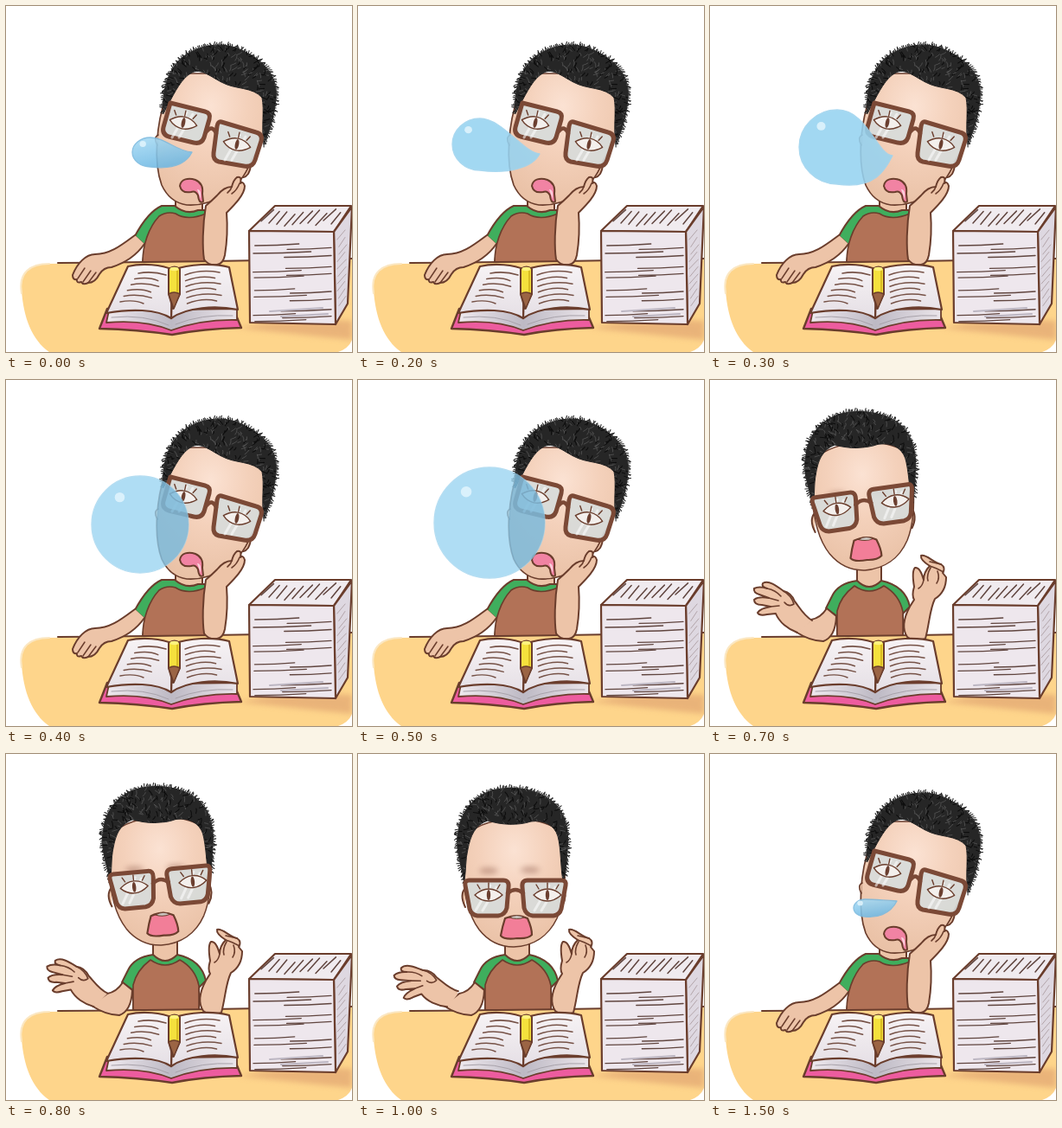
An HTML page that plays this animation: 400 by 400 pixels, repeating every 1600 ms.

```html
<!DOCTYPE html>
<html lang="en">
<head>
<meta charset="utf-8">
<title>Asleep at the desk</title>
<style>
html, body { margin: 0; width: 100%; height: 100%; overflow: hidden; background: #fff; }
svg { display: block; width: 100vw; height: 100vh; }
</style>
</head>
<body>
<svg id="stage" viewBox="0 0 400 400" fill="none" stroke-linecap="round" stroke-linejoin="round">
  <defs>
    <radialGradient id="brow" cx=".5" cy=".25" r=".75">
      <stop offset="0" stop-color="#fbe2d3"/><stop offset=".45" stop-color="#f4d1bb"/><stop offset="1" stop-color="#eac2a7"/>
    </radialGradient>
    <linearGradient id="page" x2="0" y2="1">
      <stop offset="0" stop-color="#f7f3f5"/><stop offset="1" stop-color="#e5dfe5"/>
    </linearGradient>
    <linearGradient id="edge">
      <stop offset="0" stop-color="#efe9ee"/><stop offset=".5" stop-color="#bdb9c4"/><stop offset="1" stop-color="#ebe5ea"/>
    </linearGradient>
    <linearGradient id="water" x2=".4" y2="1">
      <stop offset="0" stop-color="#a9dcf5"/><stop offset="1" stop-color="#6fb9e4"/>
    </linearGradient>
    <filter id="soft" x="-50%" y="-50%" width="200%" height="200%"><feGaussianBlur stdDeviation="3"/></filter>
    <clipPath id="cheek"><path id="cheekShape"/></clipPath>
  </defs>
  <g id="bodies"></g>
  <g id="desk"></g>
  <g id="people"></g>
  <g id="props"></g>
  <g id="bubble"></g>
  <g id="rays"></g>
</svg>
<script>
(() => {
const LINE = '#6a3d2c', FRAME = '#7b4936', SKIN = '#edc4a8', GREEN = '#3fae5d', SHIRT = '#b27257';
const $ = id => document.getElementById(id);
const path = (d, fill = 'none', stroke = LINE, w = 2, more = '') =>
  `<path d="${d}" fill="${fill}" stroke="${stroke}" stroke-width="${w}" ${more}/>`;
const oval = (x, y, rx, ry, fill, more = '') =>
  `<ellipse cx="${x}" cy="${y}" rx="${rx}" ry="${ry}" fill="${fill}" ${more}/>`;
const group = (id, inner) => `<g id="${id}">${inner}</g>`;
const mix = (a, b, k) => a + (b - a) * k;

let seed = 7;
const rnd = () => (seed = seed * 16807 % 2147483647) / 2147483647;

// Dark mass with short strands inside and tufts along the outer arc
function hair(id, outer, inner, cx, cy) {
  const arc = document.createElementNS('http://www.w3.org/2000/svg', 'path');
  arc.setAttribute('d', outer);
  const len = arc.getTotalLength();
  let tufts = '', strands = '', dark = '';
  for (let s = 0; s < len; s += 2) {
    const p = arc.getPointAtLength(s), a = Math.atan2(p.y - cy, p.x - cx) + (rnd() - .5) * 1.6;
    const r = 1.5 + rnd() * 3;
    tufts += `M${p.x},${p.y}l${Math.cos(a) * r},${Math.sin(a) * r}`;
  }
  for (let i = 0; i < 620; i++) {
    const x = cx + (rnd() - .5) * 140, y = cy + (rnd() - .5) * 126;
    const a = Math.atan2(y - cy - 30, x - cx) + (rnd() - .5) * 2, r = 3 + rnd() * 4;
    const dx = Math.cos(a) * r, dy = Math.sin(a) * r;
    const d = `M${x},${y}q${dx * .6 + 1},${dy * .6} ${dx},${dy}`;
    if (i % 2) strands += d; else dark += d;
  }
  const d = outer + inner;
  return `<clipPath id="${id}"><path d="${d}"/></clipPath>` +
    path(d, '#262626', '#262626', 1) + path(tufts, 'none', '#262626', 1.1) +
    `<g clip-path="url(#${id})">${path(strands, 'none', '#5d5d5d', .7)}${path(dark, 'none', '#0d0d0d', 1.1)}</g>`;
}

const eye = (x, y, turn) => `<g transform="translate(${x} ${y}) rotate(${turn})">` +
  path('M-16,0Q-8,-7 0,-7Q9,-7 16,0Q8,7 0,7Q-9,7 -16,0Z', '#f3efec', LINE, 1.4) +
  oval(0, 0, 2.2, 6, '#6b3f30') +
  path('M-10,-7L-13,-12M0,-8V-14M10,-7L13,-12', 'none', LINE, 1.4) + '</g>';

const lens = d => path(d, 'rgba(215,220,219,.9)', FRAME, 5);
const glare = (x, y) => path(`M${x},${y + 15}L${x + 17},${y - 14}M${x + 8},${y + 15}L${x + 24},${y - 12}`,
  'none', 'rgba(255,255,255,.55)', 3);

// Desk
$('desk').innerHTML =
  path('M46,298C26,299 17,309 18,328C20,360 30,386 50,400H384Q396,396 400,386V293C290,294 160,297 46,298Z', '#fed58b', 'none') +
  path('M268,372Q330,360 400,364V386Q340,380 268,372Z', '#e3a873', 'none', 0, 'filter="url(#soft)" opacity=".75"') +
  path('M18,332C14,308 28,298 50,298', 'none', '#fbe7c2', 2) +
  path('M60,297Q220,296 400,292', 'none', LINE, 2);

// Book, pencil and paper stack
let ruled = '';
for (let i = 0; i < 6; i++) {
  const y = 309 + i * 6.6, x = 153 - i * 4.2;
  ruled += `M${x},${y}q16,-3 ${i % 2 ? 27 : 32},2`;
  ruled += `M${207 + i * .5},${y + 2}q18,-7 ${i % 2 ? 34 : 40},-3`;
}
const book =
  path('M117,350L108,373Q152,374 192,380Q228,373 272,372L262,348Z', '#ed5c9f', LINE, 2.4) +
  path('M119,352L116,366Q160,362 191,375Q226,362 267,363L267,350Z', 'url(#edge)', LINE, 1.8) +
  path('M141,301C158,297 180,299 193,305L191,361C174,350 144,350 116,355Z', 'url(#page)', LINE, 2.2) +
  path('M193,305C212,298 240,297 258,302L268,351C242,346 209,348 191,361Z', 'url(#page)', LINE, 2.2) +
  path(ruled, 'none', '#765247', 1.5) +
  path('M122,360Q160,356 188,369M196,368Q226,356 262,358', 'none', '#a8a2aa', 1);
const pencil =
  path('M188,304V333L193,350L201,333V304Q195,299 188,304Z', '#f5e13d', LINE, 2) +
  path('M188,333Q194,329 201,333L194,350Z', '#9b6444', LINE, 1.5) +
  path('M198,306V330', 'none', '#d8bb22', 2) + oval(194.5, 304, 5, 2.2, '#fff27e');

let frontLines = '', topLines = '', sideLines = '';
for (let b = 0; b < 4; b++) {
  for (let i = 0; i < 4; i++) {
    const y = 276 + b * 25 + i * 4 + rnd() * 2, right = (b + i) % 2;
    const x = right ? 312 + rnd() * 18 : 285 + rnd() * 3, end = right ? 376 : 330 + rnd() * 30;
    frontLines += `M${x},${y + 1}Q${(x + end) / 2},${y + 1} ${end},${y - 1}`;
  }
}
for (let i = 0; i < 10; i++) {
  const x = 295 + i * 9, dy = rnd() * 10;
  topLines += `M${x},${256 - dy}l${10 + rnd() * 5},-${13 + rnd() * 2}`;
  sideLines += `M${382 + rnd() * 3},${270 + i * 8.5}l${7 + rnd() * 4},-11`;
}
const papers =
  path('M281,260L311,231L399,231L379,261Z', '#f0ebef', LINE, 2.2) +
  path('M379,261L400,232L395,344L381,368Z', '#ded8e1', LINE, 2.2) +
  path('M281,260L379,261L381,368L282,366Z', '#eee7ed', LINE, 2.2) +
  path(frontLines, 'none', '#60453f', 1.4) + path(topLines, 'none', '#60453f', 1.5) +
  path(sideLines, 'none', '#b3a5aa', 1) +
  path('M305,353L366,349M318,359L372,356', 'none', '#bcb6c2', 2);
$('props').innerHTML = book + pencil + papers;

// Torsos sit behind the desk edge
$('bodies').innerHTML =
  group('napBody',
    path('M196,212V237Q211,244 227,236V218Z', SKIN) +
    path('M180,231Q164,238 149,266L161,277L158,296H232L231,236L222,236Q208,242 195,231Z', GREEN) +
    path('M158,296C158,276 165,256 177,243Q186,237 196,240Q210,249 231,240V296Z', SHIRT, LINE, 1.6)) +
  group('wokeBody',
    path('M170,208V239Q184,246 198,239V208Z', SKIN) +
    path('M170,232Q148,235 141,250L134,264L147,273V296H223V270L231,262Q226,238 198,232Q184,246 170,232Z', GREEN) +
    path('M147,296V267Q151,250 167,238Q184,250 201,238Q219,248 223,268V296Z', SHIRT, LINE, 1.6));

// Dozing pose
const napFace = 'M185,105C174,135 170,180 180,207C186,220 195,228 209,230C238,232 270,213 282,182L299,150V104L256,78H205Z';
$('cheekShape').setAttribute('d', napFace);
const napHead =
  path('M276,178Q287,180 280,194Q275,201 268,196', SKIN) +
  path(napFace, 'url(#brow)', LINE, 1.7) +
  path('M176,149Q170,152 175,161', SKIN, LINE, 1.6) +
  hair('napHair', 'M182,124C180,100 186,78 200,63C215,48 245,39 270,50C296,61 315,80 312,107C310,130 303,148 298,160',
    'C295,140 299,120 296,106C285,93 265,97 249,88C234,80 225,72 215,77C203,83 195,100 188,113Z', 248, 100) +
  lens('M190,112L230,122Q237,124 235,131L229,152Q226,160 217,158L188,151Q180,148 182,140Z') +
  lens('M249,134L289,146Q297,148 295,156L288,178Q285,187 275,185L246,180Q239,178 240,170L244,139Q245,133 249,134Z') +
  glare(192, 137) + glare(253, 163) + eye(205, 135, 12) + eye(267, 160, 12) +
  path('M232,145Q238,137 243,147', 'none', FRAME, 4.5) +
  path('M201,208C202,200 211,198 219,201C226,204 228,210 227,217L228,226Q223,229 222,219Q219,213 214,215Q203,217 201,208Z', '#f183a3', LINE, 2) +
  path('M221,212Q226,211 225,223', '#fbd3dd', 'none');
const napArms =
  path('M149,265C134,276 121,287 103,287C92,287 82,298 77,311Q77,317 82,316Q81,321 87,319Q89,323 95,320Q103,320 108,310Q113,302 122,302Q147,294 160,275', SKIN) +
  path('M83,315L91,303M89,319L98,306M95,320L104,308', 'none', LINE, 1.5) +
  path('M231,231C227,255 227,280 229,293Q235,301 244,299Q251,298 253,288Q257,264 255,239C264,230 276,218 276,208Q274,202 271,205Q273,196 267,198Q263,201 261,209Q252,209 244,219Q238,225 231,231Z', SKIN) +
  path('M270,205Q267,213 261,217M261,209Q260,213 256,216', 'none', LINE, 1.6);

// Startled pose
const wokeFace =
  path('M124,155Q117,163 124,177M236,152Q243,163 236,176', SKIN) +
  path('M122,130C122,165 128,187 140,203C151,217 165,223 180,223C202,222 220,211 230,190C237,174 240,150 239,125L231,88C210,70 150,70 128,92Z', 'url(#brow)', LINE, 1.5) +
  `<g filter="url(#soft)" opacity=".4">${oval(151, 135, 11, 4, '#8a5747')}${oval(199, 134, 11, 4, '#8a5747')}</g>` +
  hair('wokeHair', 'M123,146C118,125 112,105 116,90C119,65 136,46 160,41C185,36 215,43 229,59C242,73 244,95 242,110C241,125 240,138 237,147',
    'C234,130 235,110 231,95C227,82 215,76 200,78C185,83 165,82 150,77C135,82 130,95 127,110C124,122 125,135 123,146Z', 179, 98);
const rim = 'M-54,-20H-14Q-7,-20 -8,-12L-10,12Q-12,20 -20,21H-44Q-51,20 -53,13L-58,-14Q-59,-20 -54,-20Z';
const specs =
  lens(rim) + `<g transform="scale(-1 1)">${lens(rim)}</g>` +
  glare(-46, 0) + glare(22, 0) + eye(-31, -3, 0) + eye(37, -3, 0) +
  path('M-9,-5Q0,-13 9,-5', 'none', FRAME, 4.5);
const shout =
  path('M-14,-11Q0,-17 12,-11Q17,0 17,8Q12,13 0,12Q-15,14 -19,9Q-17,-2 -14,-11Z', '#f27e98', LINE, 2.2) +
  path('M-9,-12Q0,-17 8,-12Q0,-9 -9,-12Z', '#c9c4bf', LINE, 1);
const wokeHand =
  path('M118,278C108,272 103,262 98,256Q94,246 85,244C77,238 68,231 61,235Q59,239 66,241Q57,238 51,241Q50,246 57,248L68,252Q56,250 51,254Q51,260 60,260L70,262Q58,264 55,269Q57,273 66,271L76,270C80,280 90,288 101,292', SKIN) +
  path('M66,241Q76,243 82,250M68,252L79,255M70,262L80,261M85,244Q94,249 97,259Q91,263 86,257', 'none', LINE, 1.6);
const wokeArms =
  path('M135,264Q128,275 117,277L99,291Q116,302 131,302Q145,297 146,273Z', SKIN) +
  path('M112,277L103,289', 'none', SKIN, 6) +
  group('hand', wokeHand) +
  path('M231,262C224,275 222,288 228,297Q238,304 249,299C254,280 254,265 260,253Q273,245 273,228L269,223Q273,217 267,213C258,211 250,201 244,203Q243,208 254,215Q247,222 247,231Q243,216 237,217Q233,221 236,239Q233,249 236,254Z', SKIN) +
  path('M254,215Q261,217 270,222M255,217Q250,226 252,232M263,221Q266,229 262,235M247,231Q246,238 241,241M254,210L267,213', 'none', LINE, 1.6);

$('people').innerHTML =
  group('nap', group('napHead', napHead) + napArms) +
  group('woke', group('face', wokeFace) + group('mouth', shout) + group('specs', specs) + wokeArms);

// Burst: a ring of radial dashes
let dashes = '';
for (let i = 0; i < 24; i++) {
  const a = i * Math.PI / 12 + .06, c = Math.cos(a), s = Math.sin(a), r = 77 + (i % 3);
  dashes += `M${147 + c * r},${163 + s * r}L${147 + c * (r + 9)},${163 + s * (r + 9)}`;
}
$('rays').innerHTML = path(dashes, 'none', '#69c1ec', 3);

// Bubble by step: centre, radii, then the tip while it is still a drop
const bubbles = [
  [167, 169, 21, 17, 215, 169],
  [154, 165, 28, 25, 212, 170],
  [141, 160, 32, 30, 210, 171],
  [147, 163, 44, 43, 211, 173],
  [155, 167, 56, 56],
  [152, 165, 64, 64]
];
const droplet = [179, 178, 13, 10, 216, 170];

function drop([x, y, rx, ry, tx, ty]) {
  const shine = oval(x - rx * .42, y - ry * .56, mix(2.5, 6, rx / 60), mix(2, 6, rx / 60), '#e2f5fd', 'opacity=".85"');
  if (!tx) {
    return oval(x, y, rx, ry, '#96d3f1', 'stroke="#9ed3ee" stroke-width="1.3" opacity=".76"') +
      oval(x, y, rx, ry, '#5f9fc4', 'opacity=".4" clip-path="url(#cheek)"') + shine;
  }
  const k = .55, big = rx > 30;
  const d = `M${tx},${ty}C${tx - 18},${ty - 1} ${x + rx * .8},${y - ry} ${x},${y - ry}` +
    `C${x - rx * k},${y - ry} ${x - rx},${y - ry * k} ${x - rx},${y}` +
    `C${x - rx},${y + ry * k} ${x - rx * k},${y + ry} ${x},${y + ry}` +
    `C${x + rx},${y + ry * 1.15} ${tx - 8},${ty + 16} ${tx},${ty}Z`;
  return path(d, big ? '#96d3f1' : 'url(#water)', big ? '#9ed3ee' : '#79b9df', 1.3, 'opacity=".88"') + shine;
}

const show = (id, on) => $(id).setAttribute('visibility', on ? 'visible' : 'hidden');
const place = (id, x, y, turn, cx = 0, cy = 0) =>
  $(id).setAttribute('transform', `translate(${x} ${y}) rotate(${turn} ${cx} ${cy})`);

let last = -1;
function draw(now) {
  const step = Math.floor(now % 1600 / 100);
  if (step !== last) {
    last = step;
    const awake = step >= 7 && step < 15, k = Math.min(1, Math.max(0, (step - 7) / 3));
    for (const id of ['nap', 'napBody']) show(id, !awake);
    for (const id of ['woke', 'wokeBody']) show(id, awake);
    show('rays', step === 6);
    $('bubble').innerHTML = step < 6 ? drop(bubbles[step]) : step === 15 ? drop(droplet) : '';
    place('napHead', step === 6 ? 1 : 0, step === 6 ? 1.5 : 0, 0);
    place('face', mix(-4, 0, k), mix(-3, 0, k), mix(-2, 0, k), 180, 130);
    place('specs', mix(178, 182, k), mix(148, 166, k), mix(-8, 0, k));
    place('mouth', mix(181, 184, k), mix(196, 201, k), mix(-3, 0, k));
    place('hand', 0, 0, mix(0, -15, k), 103, 284);
  }
  requestAnimationFrame(draw);
}
draw(performance.now());
})();
</script>
</body>
</html>
```
